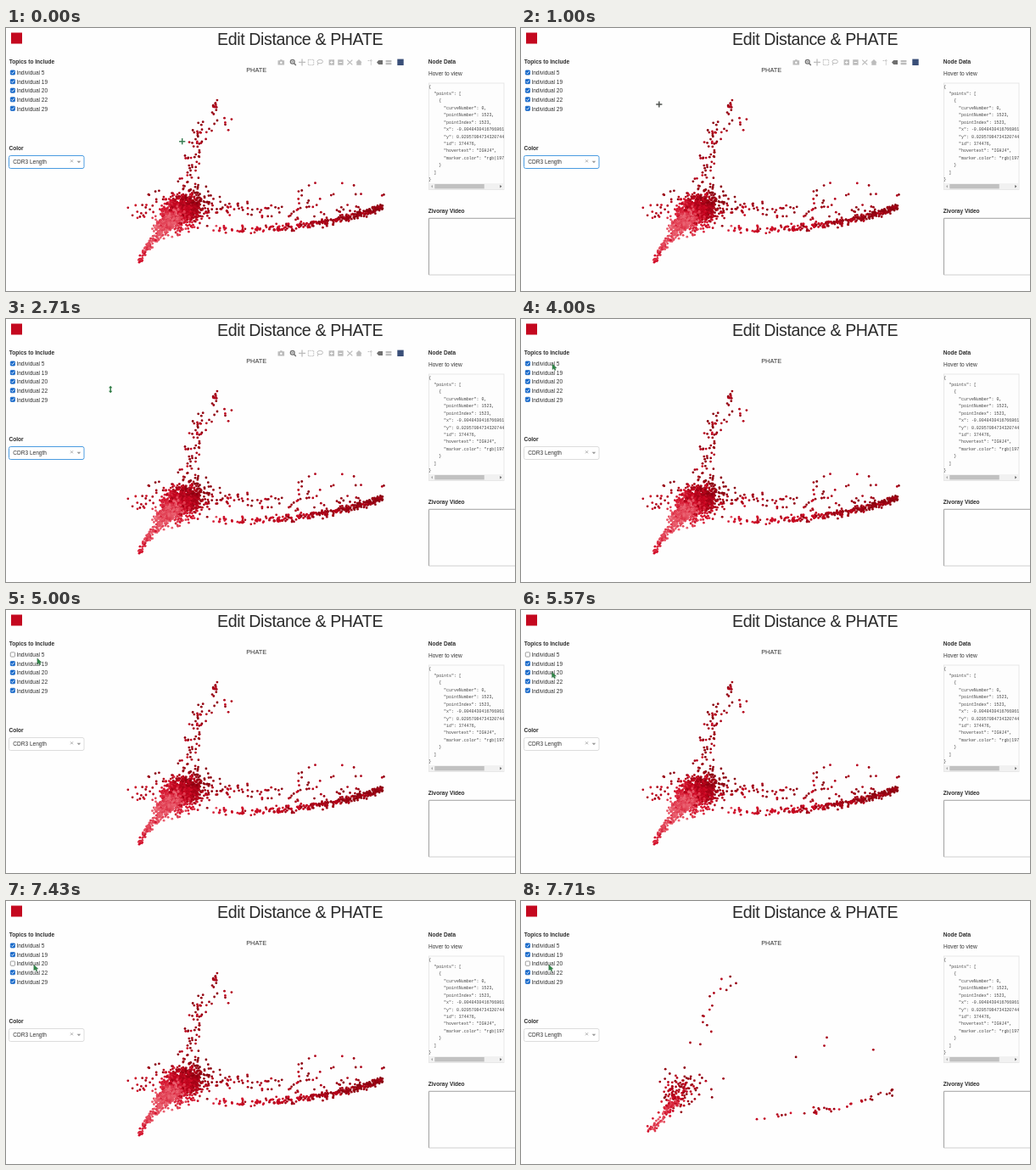
An HTML page for the animation above (8 s loop, 600 by 310 pixels).

```html
<!DOCTYPE html>
<html lang="en">
<head>
<meta charset="utf-8">
<title>Edit Distance &amp; PHATE</title>
<style>
  html, body { margin: 0; width: 100%; height: 100%; overflow: hidden; background: #fefefe; }
  svg { display: block; width: 600px; height: 310px; }
  text { font: 6.55px "Liberation Sans", Arial, sans-serif; fill: #333; white-space: pre; }
  .bold { font-weight: 700; fill: #2a2a2a; }
  .title { font-size: 19.6px; letter-spacing: -.39px; fill: #2b2b2b; }
  .plot-title { font-size: 7.4px; text-anchor: middle; }
  #json text { font: 4.95px "Liberation Mono", monospace; fill: #444; }
</style>
</head>
<body>
<svg viewBox="0 0 600 310">
  <defs><clipPath id="jsonClip"><rect x="498" y="65" width="89" height="118"/></clipPath></defs>
  <rect x="6" y="5.5" width="13" height="13" fill="#c4081f"/>
  <text class="title" x="249" y="20.3">Edit Distance &amp; PHATE</text>
  <text class="bold" x="3.8" y="41.8">Topics to Include</text>
  <g id="topics"></g>
  <text class="bold" x="3.5" y="143.5">Color</text>
  <rect id="select" x="3.5" y="150.5" width="88.5" height="15" rx="2" fill="#fff"/>
  <text x="8.3" y="160.3">CDR3 Length</text>
  <path d="M76 155.3l3 3m0-3l-3 3" stroke="#999" stroke-width=".8"/>
  <path d="M83.6 156.8h4.6l-2.3 2.4z" fill="#999"/>

  <text class="plot-title" x="295.2" y="51.8">PHATE</text>
  <g id="modebar" fill="#bcbcbc" stroke="#bcbcbc" stroke-width="0">
    <path d="M320.5 38.2h2l.8-1h2l.8 1h2v5.3h-7.6z"/>
    <circle cx="324.3" cy="40.7" r="1.2" fill="#fff"/>
    <g stroke="#737373" fill="none">
      <circle cx="337.7" cy="39.7" r="2.4" stroke-width="1.3"/>
      <path d="M339.5 41.6l2.3 2.4" stroke-width="1.5"/>
      <path d="M336.4 39.7h2.6m-1.3-1.3v2.6" stroke-width=".6"/>
    </g>
    <path d="M345 40.4h8m-4-4v8" stroke-width="1.3"/>
    <rect x="356.3" y="37.3" width="6.4" height="6.4" fill="none" stroke-width="1" stroke-dasharray="1.4 .8"/>
    <ellipse cx="370.2" cy="39.6" rx="3.3" ry="2.2" fill="none" stroke-width="1"/>
    <path d="M367.8 41.2l-.3 2.6" stroke-width="1"/>
    <rect x="380.6" y="37.3" width="6.4" height="6.4"/>
    <rect x="391.2" y="37.3" width="6.4" height="6.4"/>
    <path d="M382 40.5h3.6m-1.8-1.8v3.6M392.6 40.5h3.6" stroke="#fff" stroke-width="1"/>
    <path d="M402.3 37.6l6 5.8m0-5.8l-6 5.8" stroke-width="1.3"/>
    <path d="M412.3 40.6l3.7-3.6 3.7 3.6h-1v3.1h-5.4v-3.1z"/>
    <path d="M426.5 38.5h5m-1.2-1.5v7" fill="none" stroke-width=".9" stroke-dasharray="1.5 .6"/>
    <path d="M437 40.5l2.2-2.5h4.8v5h-4.8z" fill="#6f6f6f"/>
    <path d="M447.6 38h6.8v2.2h-6.8zm0 3h6.8v2.2h-6.8z"/>
    <rect x="461.3" y="36.6" width="7.4" height="7.4" fill="#3a4f78"/>
  </g>
  <g id="allDots"></g>
  <g id="fewDots"></g>

  <text class="bold" x="497.8" y="41.8">Node Data</text>
  <text x="498" y="55.6">Hover to view</text>
  <rect x="498.5" y="65" width="88.5" height="125.5" fill="#fdfdfd" stroke="#e1e1e1" stroke-width=".8"/>
  <g id="json" clip-path="url(#jsonClip)"></g>
  <rect x="498.8" y="183.2" width="88" height="7" fill="#f1f1f1"/>
  <rect x="505.3" y="184" width="58.5" height="5.4" fill="#c1c1c1"/>
  <path d="M503 185l-2 1.7 2 1.7z" fill="#aaa"/>
  <path d="M582.3 185l2 1.7-2 1.7z" fill="#555"/>
  <text class="bold" x="497.8" y="217.7">Zivoray Video</text>
  <path d="M498.5 291V224.3H601" fill="none" stroke="#a2a2a2"/>
  <path d="M498.5 291H601" stroke="#cfcfcf"/>

  <g id="cursor">
    <path id="cross" d="M-3.6 0h7.2M0-3.6v7.2" stroke-width="1.5"/>
    <path id="resize" d="M0-4.3l2.2 2.6H.7v3.4h1.5L0 4.3l-2.2-2.6h1.5v-3.4h-1.5z" fill="#2c7a42"/>
    <path id="arrow" d="M0 0v6.6l1.6-1.4 1.2 2.4 1.2-.6-1-2.3h2z" fill="#2f8a48" stroke="#2a5a38" stroke-width=".4"/>
  </g>
</svg>
<script>
const LOOP = 8000, TICKS_PER_SECOND = 7;
const TOPICS = [5, 19, 20, 22, 29];
const $ = id => document.getElementById(id);
const show = (id, on) => $(id).setAttribute("display", on ? "inline" : "none");

// Left column and JSON panel
$("topics").innerHTML = TOPICS.map((n, i) => {
  const y = 49.9 + i * 10.58;
  return `<rect id="box${n}" x="5.3" y="${y}" width="5.2" height="5.2" rx=".8" stroke-width=".7"/>
    <path id="tick${n}" d="M6.4 ${y + 2.7}l1.2 1.2 2-2.6" fill="none" stroke="#fff" stroke-width=".9"/>
    <text x="12.4" y="${y + 5.4}">Individual ${n}</text>`;
}).join("");

$("json").innerHTML = `{
  "points": [
    {
      "curveNumber": 0,
      "pointNumber": 1523,
      "pointIndex": 1523,
      "x": -0.0048430416766861,
      "y": 0.02057094734320744,
      "id": 374476,
      "hovertext": "IGHJ4",
      "marker.color": "rgb(197,
    }
  ]
}`.split("\n").map((line, i) => `<text x="498.3" y="${70.6 + i * 8.42}">${line}</text>`).join("");

// Scatter plot
let seed = 11;
function random() {
  seed = seed + 0x6D2B79F5 | 0;
  let r = Math.imul(seed ^ seed >>> 15, 1 | seed);
  r = r + Math.imul(r ^ r >>> 7, 61 | r) ^ r;
  return ((r ^ r >>> 14) >>> 0) / 4294967296;
}
const gauss = () => (random() + random() + random() + random() - 2) * 1.73;
const mix = (a, b, p) => a + (b - a) * p;
const repeat = (count, make) => Array.from({ length: count }, make).join("");

const PINK = [234, 98, 113], RED = [208, 8, 36], DARK = [138, 0, 14];
function dot(x, y, tone) {
  const v = Math.min(1, Math.max(0, tone + gauss() * .13)) * 2;
  const [from, to] = v < 1 ? [PINK, RED] : [RED, DARK];
  const color = from.map((c, k) => Math.round(mix(c, to[k], v % 1 || +(v === 2))));
  return `<circle cx="${x.toFixed(1)}" cy="${y.toFixed(1)}" r="1.4" fill="rgb(${color})"/>`;
}

// Sequences get longer, so darker, towards the upper right of the cluster.
const lengthTone = (x, y) => .55 + (x - 205 - (y - 215)) / 105;

// Gaussian cloud, turned by an angle in degrees
function cloud(count, [cx, cy], [sx, sy], degrees, toneAt = lengthTone) {
  const c = Math.cos(degrees * Math.PI / 180), s = Math.sin(degrees * Math.PI / 180);
  return repeat(count, () => {
    const u = gauss() * sx, v = gauss() * sy;
    const x = cx + u * c - v * s, y = cy + u * s + v * c;
    return dot(x, y, toneAt(x, y));
  });
}

// Dots along a quadratic curve; a skew below 1 crowds them towards its end.
function trail(count, [a, b, c], width, tone0, tone1, skew = 1) {
  return repeat(count, () => {
    const p = random() ** skew;
    const along = k => mix(mix(a[k], b[k], p), mix(b[k], c[k], p), p) + gauss() * width;
    return dot(along(0), along(1), mix(tone0, tone1, p));
  });
}

const dark = () => .88, red = () => .66, pink = () => .1;

$("allDots").innerHTML =
  trail(14, [[246, 112], [245, 98], [248, 83]], 1.8, .88, .9) +
  cloud(5, [255, 114], [5, 6], 0, dark) +
  trail(62, [[216, 190], [220, 150], [236, 118]], 6, .85, .82) +
  cloud(14, [375, 192], [32, 5], 0, dark) +
  cloud(16, [158, 218], [8, 6], 0, red) +
  cloud(10, [180, 197], [8, 4], 0, dark) +
  trail(85, [[240, 213], [310, 216], [420, 214]], 6, .75, .9) +
  trail(300, [[240, 237], [370, 240], [443, 211]], 2.2, .45, 1, .65) +
  cloud(230, [213, 215], [17, 10], -12) +
  cloud(260, [211, 209], [12, 8], -20) +
  cloud(380, [203, 219], [12, 8], -38) +
  cloud(250, [192, 229], [9, 4.5], -42, pink) +
  trail(80, [[165, 261], [174, 249], [190, 236]], 2, .12, .05) +
  trail(22, [[156, 276], [160, 270], [167, 260]], 1.3, .42, .25);

$("fewDots").innerHTML =
  trail(17, [[211, 173], [212, 130], [246, 88]], 5, .82, .85) +
  cloud(4, [365, 185], [28, 12], 0, dark) +
  trail(42, [[275, 255], [380, 250], [443, 221]], 2.2, .6, .9) +
  cloud(22, [200, 222], [16, 12], 0, dark) +
  cloud(75, [187, 222], [9, 7], -12, () => .76) +
  cloud(35, [180, 231], [6, 7], -40, red) +
  cloud(65, [175, 243], [7, 4], -40, () => .3) +
  trail(38, [[147, 274], [158, 263], [172, 252]], 2.5, .25, .15);

// Cursor: each move runs from one tick to another and ends at a point.
const START = [207.7, 133.7], ON_FIRST = [37, 53], ON_THIRD = [36.5, 73.2];
const MOVES = [
  { from: 2, to: 7, end: [162.8, 90] },
  { from: 7, to: 13, end: [134, 84] },
  { from: 15, to: 19, end: [123.2, 83] },
  { from: 19, to: 23, end: ON_FIRST },
  { from: 34, to: 39, end: ON_THIRD },
  { from: 41, to: 43, end: ON_FIRST },
  { from: 44, to: 47, end: [32.8, 75.2] }
];
function cursorAt(tick) {
  return MOVES.reduce((point, { from, to, end }) => {
    const p = Math.min(1, Math.max(0, (tick - from) / (to - from)));
    return point.map((v, k) => mix(v, end[k], p));
  }, START);
}

function setChecked(n, on) {
  $("box" + n).setAttribute("fill", on ? "#1668c9" : "#fff");
  $("box" + n).setAttribute("stroke", on ? "#1668c9" : "#777");
  show("tick" + n, on);
}

function render(time) {
  // The picture changes on whole ticks; the small lead absorbs rounded times.
  const tick = Math.floor((time % LOOP + 8) * TICKS_PER_SECOND / 1000);
  const unchecked = { 5: tick >= 29 && tick < 44, 20: tick >= 52 };
  const redrawn = tick >= 54;
  $("cursor").setAttribute("transform", `translate(${cursorAt(tick)})`);
  $("cross").setAttribute("stroke", tick < 5 ? "#3a7f55" : "#505450");
  show("cross", tick < 17);
  show("resize", tick >= 17 && tick < 20);
  show("arrow", tick >= 20);
  $("modebar").setAttribute("opacity", Math.min(1, Math.max(0, (22 - tick) / 2)));
  $("select").setAttribute("stroke", tick < 28 ? "#4a9be0" : "#dcdcdc");
  TOPICS.forEach(n => setChecked(n, !unchecked[n]));
  show("allDots", !redrawn);
  show("fewDots", redrawn);
}

const start = performance.now();
function loop() {
  render(performance.now() - start);
  requestAnimationFrame(loop);
}
loop();
</script>
</body>
</html>
```
